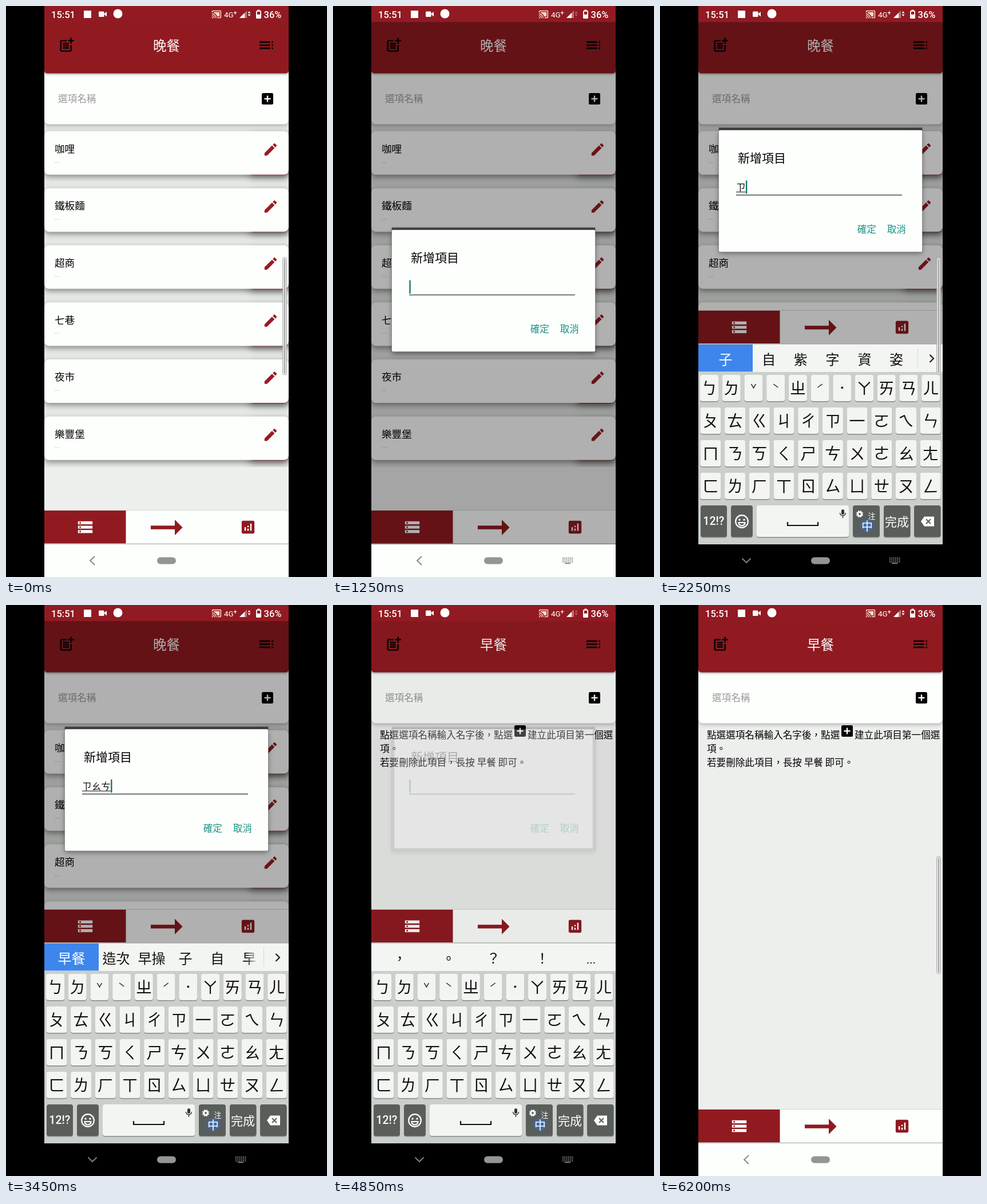
Recreate the animation shown at these times as an HTML page with a canvas. Size 561 px wide and 997 px high, loop 6.25 s.

```html
<!DOCTYPE html>
<html lang="zh-Hant">
<head>
<meta charset="utf-8">
<style>
html, body { margin: 0; width: 561px; height: 997px; overflow: hidden; background: #000; }
canvas { display: block; width: 561px; height: 997px; }
</style>
</head>
<body>
<canvas id="stage"></canvas>
<script>
const canvas = document.getElementById('stage');
const c = canvas.getContext('2d');
const ratio = window.devicePixelRatio || 1;
canvas.width = 561 * ratio;
canvas.height = 997 * ratio;

const LOOP = 6250;
const L = 67, R = 494, W = R - L;
const RED = '#901a20', WHITE = '#fdfffd', PALE = '#f3f5f2', TEAL = '#1b9181';
const CJK = '"Noto Sans CJK TC", "Noto Sans CJK", sans-serif';
const LATIN = 'Roboto, sans-serif';

const clamp = v => Math.max(0, Math.min(1, v));
const ramp = (t, a, b) => clamp((t - a) / (b - a));
const easeOut = v => 1 - (1 - v) ** 2;
const within = (t, a, b) => t >= a && t < b;

const ICON = {
  add: new Path2D('M17 19.2H5V7h7V5H5c-1.1 0-2 .9-2 2v12c0 1.1.9 2 2 2h12c1.1 0 2-.9 2-2v-7h-2zM19 2h-2v3h-3v2h3v3h2V7h3V5h-3zM7 9h8v2H7zM7 12h8v2H7zM7 15h8v2H7z'),
  toc: new Path2D('M3 7h14v2H3zM3 11h14v2H3zM3 15h14v2H3zM19 7h2v2h-2zM19 11h2v2h-2zM19 15h2v2h-2z'),
  edit: new Path2D('M3 17.25V21h3.75L17.8 9.94l-3.75-3.75zM20.7 7.04c.4-.4.4-1 0-1.4l-2.34-2.35c-.4-.4-1-.4-1.4 0l-1.84 1.83 3.75 3.75z'),
  rows: new Path2D('M2 20h20v-4H2zm2-3h2v2H4zM2 4v4h20V4zm4 3H4V5h2zm-4 7h20v-4H2zm2-3h2v2H4z'),
  chart: new Path2D('M19 3H5c-1.1 0-2 .9-2 2v14c0 1.1.9 2 2 2h14c1.1 0 2-.9 2-2V5c0-1.1-.9-2-2-2zM9 17H7v-5h2zm4 0h-2v-3h2zm0-5h-2v-2h2zm4 5h-2V7h2z'),
  cast: new Path2D('M1 18v3h3c0-1.7-1.3-3-3-3zM1 14v2a5 5 0 0 1 5 5h2a7 7 0 0 0-7-7zM1 10v2a9 9 0 0 1 9 9h2A11 11 0 0 0 1 10zM21 3H3c-1.1 0-2 .9-2 2v3h2V5h18v14h-7v2h7c1.1 0 2-.9 2-2V5c0-1.1-.9-2-2-2zM5 7v1.6a13 13 0 0 1 8.4 8.4H19V7z'),
  back: new Path2D('M22 4H8L2 12l6 8h14zM11 8l8 8M19 8l-8 8')
};

function rect(x, y, w, h, fill) {
  c.fillStyle = fill;
  c.fillRect(x, y, w, h);
}
function round(x, y, w, h, r, fill) {
  c.beginPath();
  c.roundRect(x, y, w, h, r);
  c.fillStyle = fill;
  c.fill();
}
function circle(x, y, r, fill) {
  c.beginPath();
  c.arc(x, y, r, 0, 7);
  c.fillStyle = fill;
  c.fill();
}
function line(pts, color, width) {
  c.beginPath();
  pts.forEach(([x, y], i) => i ? c.lineTo(x, y) : c.moveTo(x, y));
  c.strokeStyle = color;
  c.lineWidth = width;
  c.stroke();
}
function poly(pts, fill) {
  c.beginPath();
  pts.forEach(([x, y]) => c.lineTo(x, y));
  c.fillStyle = fill;
  c.fill();
}
// Ideographs are centred vertically on y.
function cjk(s, x, y, size, fill, align = 'left') {
  c.font = size + 'px ' + CJK;
  c.textAlign = align;
  c.fillStyle = fill;
  c.fillText(s, x, y + size * 0.38);
}
function latin(s, x, y, size, fill, weight = 400, align = 'left') {
  c.font = weight + ' ' + size + 'px ' + LATIN;
  c.textAlign = align;
  c.fillStyle = fill;
  c.fillText(s, x, y);
}
function icon(path, cx, cy, scale, fill) {
  c.save();
  c.translate(cx - 12 * scale, cy - 12 * scale);
  c.scale(scale, scale);
  c.fillStyle = fill;
  c.fill(path, 'evenodd');
  c.restore();
}
function shadowed(alpha, blur, dy, draw) {
  c.save();
  c.shadowColor = `rgba(0,0,0,${alpha})`;
  c.shadowBlur = blur * ratio;
  c.shadowOffsetY = dy * ratio;
  draw();
  c.restore();
}
function clipped(x, y, w, h, draw) {
  c.save();
  c.beginPath();
  c.rect(x, y, w, h);
  c.clip();
  draw();
  c.restore();
}

function plusBox(x, y) {
  round(x, y, 20, 20, 2.5, '#000');
  rect(x + 4.5, y + 8.8, 11, 2.4, WHITE);
  rect(x + 8.8, y + 4.5, 2.4, 11, WHITE);
}

function statusBar(t) {
  rect(L, 0, W, 28, '#921a22');
  latin('15:51', 79, 20.5, 16.5, '#fff', 500);
  rect(136, 8, 13, 13, '#fff');
  round(162, 9.5, 9.5, 9.5, 1.5, '#fff');
  poly([[171, 14], [176, 10], [176, 18.5]], '#fff');
  circle(195.5, 13.5, 8, '#fff');
  icon(ICON.cast, 368, 14.5, 0.74, '#ffd9c8');
  latin('4G', 381, 19.5, 13.5, '#fff');
  latin('+', 397.5, 16, 11, '#fff', 500);
  poly([[408, 21], [421, 8], [421, 21]], 'rgba(255,255,255,.4)');
  poly([[408, 21], [417, 12], [417, 21]], '#fff');
  const busy = t < 900 || within(t, 1800, 3800) || t > 5500;
  const tip = busy ? '#fff' : 'rgba(255,255,255,.35)';
  poly([[422.5, 12.5], [425, 9], [427.5, 12.5]], tip);
  poly([[422.5, 14.5], [425, 18], [427.5, 14.5]], tip);
  rect(439.5, 6.5, 4, 2, '#fff');
  round(437, 8, 9, 14, 1.5, '#fff');
  rect(438.8, 9.8, 5.4, 5, '#921a22');
  latin('36%', 450.5, 20.5, 16.5, '#fff', 500);
}

function header(title) {
  shadowed(0.28, 7, 2, () => round(L, 118, W, 88.5, [0, 0, 8, 8], WHITE));
  cjk('選項名稱', 91, 162, 16.6, '#999');
  plusBox(447, 152);
  shadowed(0.45, 4, 1, () => round(L, 28, W, 89.5, [0, 0, 5, 5], RED));
  icon(ICON.add, 106, 68.2, 1.28, '#050203');
  icon(ICON.toc, 455, 68.5, 1.33, '#050203');
  cjk(title, 280.5, 69, 23.5, '#fff', 'center');
}

const MEALS = ['咖哩', '鐵板麵', '超商', '七巷', '夜市', '樂豐堡'];
function mealList() {
  clipped(L, 118, W, 687, () => {
    rect(L, 118, W, 687, '#e4e7e4');
    MEALS.forEach((name, i) => {
      const y = 218.5 + i * 99.65;
      shadowed(0.4, 13, 4, () => round(424, y + 3, R - 424, 73.8, 8, '#b3262d'));
      shadowed(0.4, 10, 4, () => round(L, y, W, 76, 8, WHITE));
      cjk(name, 85, y + 30.5, 17.6, '#000');
      latin('...', 85, y + 55, 11, '#999');
      icon(ICON.edit, 462.5, y + 32, 1.186, '#9a1b22');
    });
  });
}

function hint() {
  const size = 16.6;
  cjk('點選選項名稱輸入名字後，點選', 82, 227, size, '#000');
  plusBox(317, 210);
  cjk('建立此項目第一個選', 340, 227, size, '#000');
  cjk('項。', 82, 251, size, '#000');
  cjk('若要刪除此項目，長按 早餐 即可。', 82, 275, size, '#000');
}

function tabs(y) {
  rect(L, y - 1, W, 1, '#d3d6d3');
  rect(L, y, W, 58, WHITE);
  rect(L, y, 142.5, 57.5, RED);
  rect(L, y + 57.5, W, 1.7, '#b9bcb9');
  icon(ICON.rows, 138.5, y + 29, 1.27, '#fff');
  rect(253, y + 26.3, 43, 6.4, RED);
  poly([[295, y + 16], [308.5, y + 29.5], [295, y + 43]], RED);
  icon(ICON.chart, 423, y + 29, 1.24, RED);
}

function navBar(dark, keysIcon) {
  rect(L, 940, W, 57, dark ? '#000' : WHITE);
  const gray = dark ? '#858785' : '#828482';
  line(dark ? [[143.5, 964.5], [151, 972], [158.5, 964.5]]
            : [[155, 961], [147, 968.5], [155, 976]], gray, 1.8);
  round(264, 962.5, 33, 12, 6, '#949694');
  if (!keysIcon) return;
  for (let r = 0; r < 3; r++)
    for (let k = 0; k < 6; k++)
      rect(401 + k * 3.3, 963 + r * 3.3, 1.9, 1.9, gray);
  rect(405, 972.3, 10, 1.8, gray);
}

function edgeHandle() {
  c.beginPath();
  c.roundRect(483.7, 439, 6.6, 205, 3.3);
  c.fillStyle = 'rgba(240,241,240,.85)';
  c.fill();
  c.strokeStyle = '#a0a2a0';
  c.lineWidth = 1;
  c.stroke();
  round(485.8, 441.5, 2.4, 200, 1.2, '#a9aba9');
}

function dialog(y, alpha, text, composing, caret) {
  const x = 102.7, w = 355.6, h = 212.5;
  c.save();
  c.globalAlpha = alpha;
  c.save();
  c.beginPath();
  c.rect(0, 0, 561, 997);
  c.rect(x, y, w, h);
  c.clip('evenodd');
  shadowed(0.45, 9, 3, () => rect(x, y, w, h, '#000'));
  c.restore();
  c.strokeStyle = 'rgba(0,0,0,.6)';
  c.lineWidth = 4.6;
  c.strokeRect(x + 2.3, y - 2, w - 4.6, h - 0.3);
  round(x, y, w, h, 2, WHITE);
  cjk('新增項目', 136, y + 48, 21, '#000');
  cjk(text, 133, y + 100, 16.6, '#111');
  const end = 133 + text.length * 16.6;
  if (composing) rect(133, y + 107.5, end - 133, 1.2, '#333');
  rect(133, y + 112.3, 290, 2.2, '#7e807e');
  if (caret) rect(end + 0.3, y + 88, 2.4, 23, '#12796d');
  cjk('確定', 344.7, y + 173, 16.6, TEAL);
  cjk('取消', 396.7, y + 173, 16.6, TEAL);
  c.restore();
}

const KEYS = ['ㄅㄉˇˋㄓˊ˙ㄚㄞㄢㄦ', 'ㄆㄊㄍㄐㄔㄗ一ㄛㄟㄣ', 'ㄇㄋㄎㄑㄕㄘㄨㄜㄠㄤ', 'ㄈㄌㄏㄒㄖㄙㄩㄝㄡㄥ'];
const TONES = {
  'ˇ': [[-4, -5], [0, 2], [4, -5]],
  'ˋ': [[-4, -5], [4, 1]],
  'ˊ': [[4, -5], [-4, 1]]
};
function key(x, y, w, h, fill) {
  round(x, y + 1.5, w, h, 4, 'rgba(70,75,70,.5)');
  round(x, y, w, h, 4, fill);
}

function candidates(list, picked) {
  rect(L, 590, W, 49, PALE);
  rect(L, 589.5, W, 1.4, '#b5b8b5');
  if (!list) {
    [...'，。？！…'].forEach((s, i) => {
      const x = 109.5 + i * 85.4;
      if (i === 4) latin('...', x, 626, 21, '#111', 400, 'center');
      else cjk(s, x + (i < 2 ? 7 : 0), 617, 24, '#111', 'center');
    });
    return;
  }
  clipped(L, 590, 374, 49, () => {
    let x = 82.5;
    list.forEach((s, i) => {
      const w = s.length * 24;
      if (picked && !i) {
        rect(L, 591, 95, 47.5, '#3e86ec');
        cjk(s, 114.5, 617, 24, '#fff', 'center');
        x = s.length > 1 ? 168.5 : 178;
        return;
      }
      cjk(s, x, 617, 24, '#111');
      x += s.length > 1 ? w + 14 : w + 31.8;
      if (s.length > 1 && list[i + 1] && list[i + 1].length < 2) x += 9;
    });
    const fade = c.createLinearGradient(420, 0, 441, 0);
    fade.addColorStop(0, 'rgba(243,245,242,0)');
    fade.addColorStop(1, PALE);
    rect(420, 592, 22, 46, fade);
  });
  rect(450, 598, 1, 34, '#d5d8d5');
  line([[471.5, 609], [478, 615.5], [471.5, 622]], '#222', 2.2);
}

function keyboard(list, picked) {
  rect(L, 639, W, 301, '#cbcfcb');
  candidates(list, picked);
  KEYS.forEach((row, r) => {
    const n = row.length, pitch = n > 10 ? 38.72 : 42.7, w = n > 10 ? 32 : 36;
    const y = 644 + r * 57;
    [...row].forEach((s, i) => {
      const cx = (n > 10 ? 86 : 88.4) + i * pitch;
      key(cx - w / 2, y, w, 46, PALE);
      if (TONES[s]) line(TONES[s].map(([a, b]) => [cx + a, y + 21 + b]), '#222', 1.5);
      else if (s === '˙') circle(cx, y + 22.5, 2, '#222');
      else cjk(s, cx, y + 23.5, 28, '#111', 'center');
    });
  });
  const dark = '#5a5e5b';
  [[71, 46], [124, 38], [337, 47], [391, 46.5], [444, 46.5]].forEach(([x, w]) => key(x, 872, w, 55, dark));
  key(169, 872, 161, 55, PALE);

  latin('12!?', 93.8, 906, 19.5, '#fff', 500, 'center');
  c.beginPath();
  c.arc(143, 900, 10.8, 0, 7);
  c.moveTo(148.5, 902);
  c.arc(143, 902, 5.5, 0, Math.PI);
  c.closePath();
  c.strokeStyle = '#fff';
  c.lineWidth = 2.2;
  c.stroke();
  circle(139, 897, 1.7, '#fff');
  circle(147, 897, 1.7, '#fff');

  line([[223, 901], [223, 907], [276, 907], [276, 901]], '#111', 2.2);
  round(317, 879, 5, 9, 2.5, '#333');
  c.beginPath();
  c.arc(319.5, 885, 5, 0, Math.PI);
  c.moveTo(319.5, 890);
  c.lineTo(319.5, 894);
  c.strokeStyle = '#333';
  c.lineWidth = 1.4;
  c.stroke();

  for (let i = 0; i < 4; i++) {
    const a = i * Math.PI / 4 + 0.4, dx = Math.cos(a) * 6, dy = Math.sin(a) * 6;
    line([[349 - dx, 887 - dy], [349 + dx, 887 + dy]], '#fff', 2.6);
  }
  circle(349, 887, 4.6, '#fff');
  circle(349, 887, 1.9, dark);
  cjk('注', 370, 890, 13, '#fff', 'center');
  c.save();
  c.shadowColor = '#2f7cf2';
  c.shadowBlur = 7 * ratio;
  for (let i = 0; i < 2; i++) cjk('中', 362, 908, 20, '#e6f0ff', 'center');
  c.restore();
  cjk('完成', 414, 900, 21, '#fff', 'center');
  poly([[456, 900], [462, 891.5], [479, 891.5], [479, 908.5], [462, 908.5]], '#fff');
  line([[465, 896], [473, 904]], dark, 2);
  line([[473, 896], [465, 904]], dark, 2);
}

// Typing steps: start time, field text, composing flag, candidate list.
const STEPS = [
  [200, '', false, null],
  [2100, 'ㄗ', true, ['子', '自', '紫', '字', '資', '姿']],
  [2700, 'ㄗㄠ', true, ['早', '造', '遭', '糟', '澡', '棗']],
  [3200, 'ㄗㄠㄘ', true, ['早餐', '造次', '早操', '子', '自', '早']],
  [3850, '早餐', false, ['店', '廳', '點', '飲', '館', '桌', '具']],
  [4650, '', false, null]
];
const OPEN = 200, RISE = 1380, CLOSE = 4700, DROP = 5000;

function render(t) {
  c.setTransform(ratio, 0, 0, ratio, 0, 0);
  rect(0, 0, 561, 997, '#000');
  const done = t >= CLOSE;
  const up = easeOut(ramp(t, RISE, RISE + 200)) - ramp(t, DROP, DROP + 180) ** 2;
  const shown = up > 0;
  const alpha = ramp(t, OPEN, OPEN + 180) - ramp(t, CLOSE, CLOSE + 200);
  const step = STEPS.filter(s => t >= s[0]).pop() || STEPS[0];

  clipped(L, 0, W, 997, () => {
    rect(L, 28, W, 912, '#edefed');
    if (!done) mealList();
    header(done ? '早餐' : '晚餐');
    if (done) hint();
    tabs(within(t, RISE + 200, DROP) ? 532 : 881);
    if (alpha > 0) {
      rect(L, 28, W, 912, `rgba(0,0,0,${0.31 * alpha})`);
      const caret = (t - step[0]) % 1000 < 500;
      const y = 391 - 174.3 * easeOut(ramp(t, RISE, RISE + 180));
      dialog(y, alpha, step[1], step[2], caret);
    }
    if (shown) {
      clipped(L, 0, W, 940, () => {
        c.translate(0, (1 - up) * 350);
        keyboard(step[3], step[2]);
      });
    }
    navBar(shown, within(t, 600, DROP + 180));
    statusBar(t);
    if (t < 450 || within(t, 1900, 2800) || t >= 5900) edgeHandle();
  });
}

let start = null;
function tick(now) {
  if (start === null) start = now;
  render((now - start) % LOOP);
  requestAnimationFrame(tick);
}
render(0);
requestAnimationFrame(tick);
</script>
</body>
</html>
```
